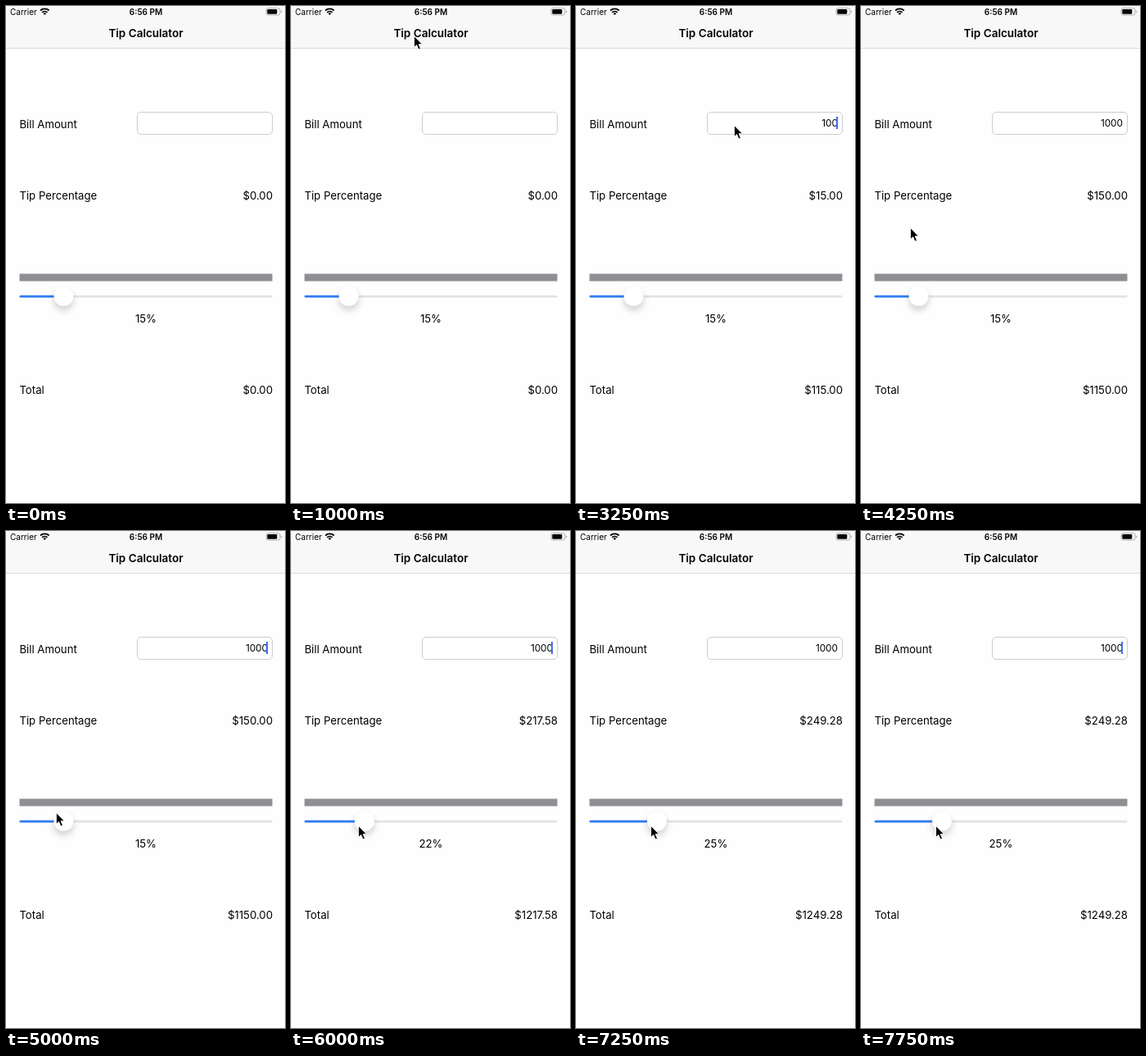
An HTML page that plays this animation: 341x606 px, repeating every 8 s.

```html
<!DOCTYPE html>
<html lang="en">
<head>
<meta charset="utf-8">
<title>Tip Calculator</title>
<style>
  html, body { margin: 0; width: 100%; height: 100%; overflow: hidden; background: #fefefe; }
  svg { display: block; width: 100%; height: 100%; }
  text { font: 13.2px Inter, sans-serif; fill: #000; }
  .end { text-anchor: end; }
  .mid { text-anchor: middle; }
  .title { font-size: 13.5px; font-weight: 600; }
  .status { font-size: 10px; }
  .bold { font-weight: 600; }
  .field { font-size: 11.8px; }
</style>
</head>
<body>
<svg viewBox="0 0 341 606">
  <defs>
    <filter id="shadow" x="-100%" y="-100%" width="300%" height="300%">
      <feDropShadow dx="0" dy="5" stdDeviation="4.4" flood-opacity=".19"/>
    </filter>
  </defs>

  <rect width="341" height="51" fill="#f8f8f8"/>
  <rect y="51" width="341" height="1" fill="#d9d9d9"/>
  <text class="status" x="5" y="11">Carrier</text>
  <g fill="none" stroke="#000" stroke-width="1.9">
    <path d="M42 5.5A7.6 7.6 0 0 1 52.6 5.5M44.1 7.9A4.6 4.6 0 0 1 50.5 7.9"/>
    <path d="M45.5 9.2A2.6 2.6 0 0 1 49.1 9.2L47.3 11Z" fill="#000" stroke="none"/>
  </g>
  <text class="status bold mid" x="171" y="11">6:56 PM</text>
  <rect x="318" y="2.7" width="17" height="8.3" rx="2.4" fill="none" stroke="#a5a5a5" stroke-width=".9"/>
  <rect x="319.3" y="4" width="12" height="5.7" rx="1.2"/>
  <path d="M336.2 5.4Q338.6 6.8 336.2 8.3Z" fill="#a5a5a5"/>
  <text class="title mid" x="171" y="38.2">Tip Calculator</text>

  <text x="16.4" y="148.7">Bill Amount</text>
  <rect x="160.5" y="129.5" width="165" height="27" rx="4.5" fill="#fff" stroke="#cdcdcd"/>
  <text class="field end" id="bill" x="320" y="147.2"></text>
  <rect id="caret" x="318" y="135" width="2" height="15" fill="#426bf2"/>

  <text x="16.4" y="236.2">Tip Percentage</text>
  <text class="end" id="tip" x="326" y="236.2"></text>

  <rect x="16.5" y="326.5" width="309" height="9" fill="#8e8e93"/>
  <rect x="16.5" y="352.8" width="309" height="2.7" rx="1.3" fill="#e3e3e5"/>
  <rect id="filled" x="16.5" y="352.8" height="2.7" rx="1.3" fill="#2f7cf6"/>
  <circle id="thumb" cy="353.8" r="12" fill="#fff" stroke="#000" stroke-opacity=".05" stroke-width=".5" filter="url(#shadow)"/>
  <text class="mid" id="percent" x="171" y="386"></text>

  <text x="16.4" y="473.2">Total</text>
  <text class="end" id="total" x="326" y="473.2"></text>

  <path id="cursor" d="M.4 .5V14.5L3.6 11.6L5.9 17L8.4 15.9L6.1 10.7H10.4Z" stroke="#fff" stroke-width=".9"/>
</svg>

<script>
const LOOP = 8000, STEP = 250;
const el = id => document.getElementById(id);

// Keys are [time, ...values]
const pointer = [
  [500, 230, 455], [750, 30, 300], [1000, 150, 36], [1250, 319, 120], [1500, 183, 155],
  [2000, 193, 145], [3750, 193, 145], [4000, 150, 190], [4250, 60, 270], [4500, 0, 330],
  [4750, 35, 346], [5000, 61, 343], [5250, 62.7, 356], [6000, 82, 359], [6750, 91, 359]
];
const rate = [[5250, 15], [6000, 21.758], [6250, 23.3], [6500, 24.2], [6750, 24.928]];

function valueAt(keys, t) {
  const next = keys.findIndex(key => key[0] > t);
  if (next < 0) return keys.at(-1).slice(1);
  if (next === 0) return keys[0].slice(1);
  const a = keys[next - 1], b = keys[next];
  const k = (t - a[0]) / (b[0] - a[0]);
  return a.slice(1).map((v, i) => v + (b[i + 1] - v) * k);
}

const dollars = n => "$" + n.toFixed(2);

function draw(now) {
  const t = Math.floor(now % LOOP / STEP) * STEP;
  const typed = "1000".slice(0, Math.max(0, (t - 2500) / STEP));
  const bill = Number(typed);
  const [percent] = valueAt(rate, t);
  const tip = bill * percent / 100;
  const thumbX = 27.6 + 2.86 * percent;
  const dragging = t > 5250;
  const [x, y] = valueAt(pointer, t);

  el("bill").textContent = typed;
  el("tip").textContent = dollars(tip);
  el("total").textContent = dollars(bill + tip);
  el("percent").textContent = Math.round(percent) + "%";
  el("thumb").setAttribute("cx", thumbX);
  el("filled").setAttribute("width", thumbX - 16.5);
  el("cursor").setAttribute("transform", `translate(${dragging ? thumbX - 7.8 : x} ${y})`);
  el("cursor").style.display = t < 500 ? "none" : "";

  const caretOn = t >= 1750 && (t < 4250 || (t - 250) % 1000 >= 500);
  el("caret").style.display = caretOn ? "" : "none";
}

const start = performance.now();
function tick() {
  draw(performance.now() - start);
  requestAnimationFrame(tick);
}
tick();
</script>
</body>
</html>
```
